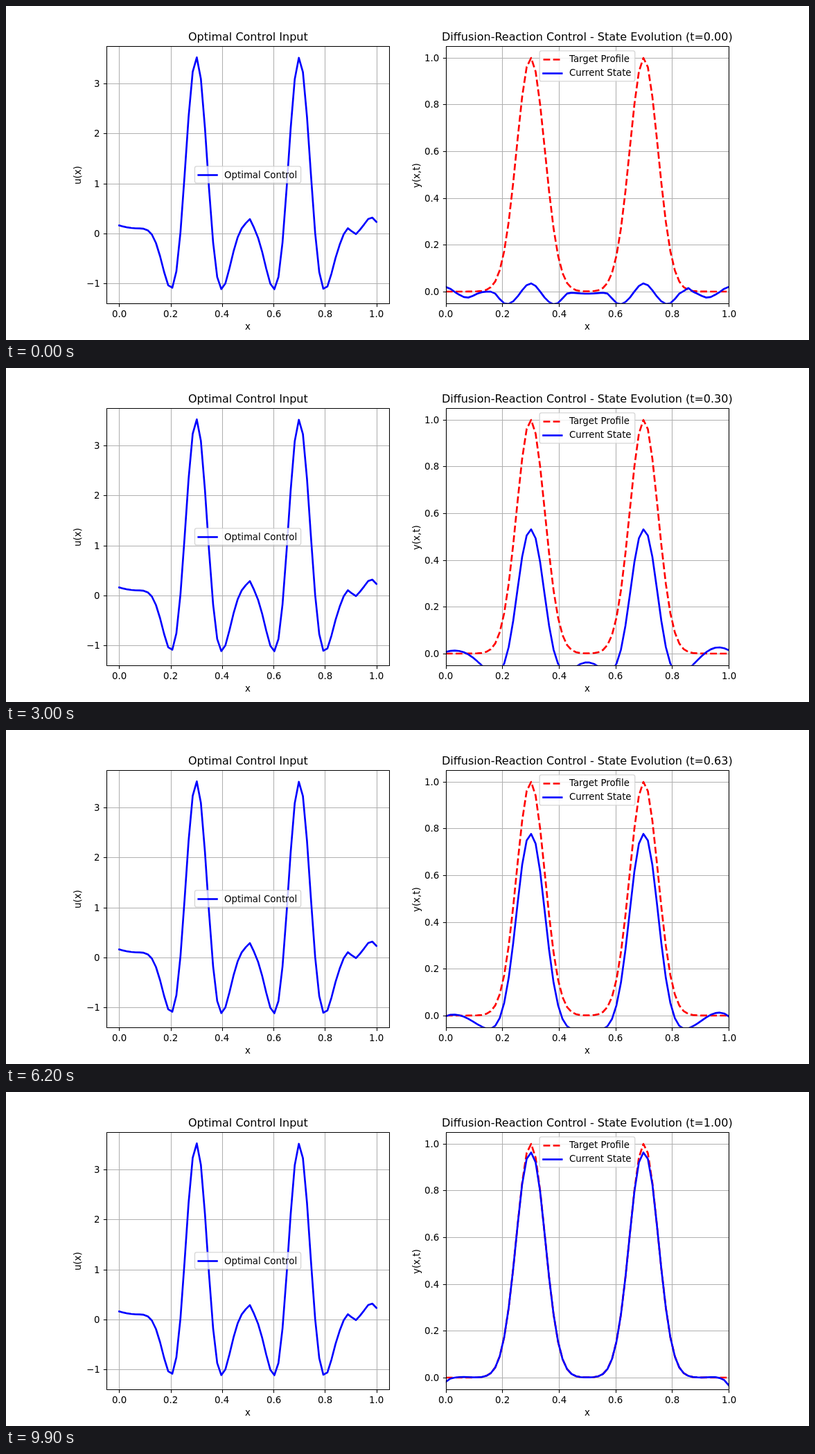
An HTML page with a canvas for the animation above (10 s loop, 1159 by 483 pixels).

```html
<!DOCTYPE html>
<html lang="en">
<head>
<meta charset="utf-8">
<title>Diffusion-Reaction Control</title>
<style>
html, body { margin: 0; width: 100%; height: 100%; overflow: hidden; background: #fff; }
canvas { display: block; }
</style>
</head>
<body>
<canvas id="stage" width="1159" height="483"></canvas>
<script>
const W = 1159, H = 483, POINTS = 64, FRAMES = 100, FRAME_MS = 100;
const FONT = '"DejaVu Sans", sans-serif';
const TEXT = 40 / 3, LINE = 8 / 3, HAIR = 1.067, TICK = 4.667;
const TOP = 57.96, BOTTOM = 429.87;
const ctx = document.getElementById('stage').getContext('2d');

const xs = Array.from({ length: POINTS }, (_, i) => i / (POINTS - 1));
const bell = z => Math.exp(-z * z / 2);
const bump = (x, height, center, width) => height * Math.exp(-(((x - center) / width) ** 2));
const bothHumps = (x, f) => f((x - 0.3) / 0.05) + f((x - 0.7) / 0.05);

const targetAt = x => bothHumps(x, bell);

// Damped wave around each hump over a gently uneven background.
const controlAt = x =>
  bothHumps(x, z => 3.52 * Math.cos(Math.PI * z / 2.48) * Math.exp(-0.235 * z * z))
  + 0.16 * Math.exp(-x / 0.1)
  + bump(x, 0.14, 0.5, 0.06) + bump(x, 0.1, 0.508, 0.012)
  + bump(x, 0.1, 0.885, 0.015) - bump(x, 0.06, 0.92, 0.012)
  + bump(x, 0.32, 0.98, 0.035);

const initialAt = x =>
  bothHumps(x, z => bump(z, 0.1, 0, 1.02) - 0.065 * Math.exp(-((z / 2.3) ** 8)))
  + bump(x, 0.02, 0, 0.025) - bump(x, 0.026, 0.075, 0.035)
  - bump(x, 0.009, 0.5, 0.07)
  + bump(x, 0.016, 0.857, 0.012) - bump(x, 0.026, 0.925, 0.035) + bump(x, 0.02, 1, 0.025);

const finalAt = x => targetAt(x)
  - bothHumps(x, z => bump(z, 0.037, 0, 0.45))
  + bump(x, 0.003, 0.06, 0.03) + bump(x, 0.003, 0.95, 0.03)
  - 0.018 * Math.exp(-x / 0.012) - 0.033 * Math.exp((x - 1) / 0.015);

// Diffusing response of one hump to a constant source.
function response(z, t) {
  const rate = 6.4, spread = Math.sqrt(1 + rate * t), steps = 16;
  let sum = 0;
  for (let i = 0; i < steps; i++) sum += bell(z / (1 + (spread - 1) * (i + 0.5) / steps));
  const stored = 2 / rate * (spread - 1) * sum / steps;
  return 0.84 * (bell(z) - bell(z / spread) / spread) + 0.8 * stored;
}

// Diffusion, a drift towards the final profile, and fading start and edge effects.
function stateAt(x, t) {
  const respond = time => bothHumps(x, z => response(z, time));
  const edge = bump(x, 0.014, 0.04, 0.06) + bump(x, 0.03, 0.96, 0.06);
  const trough = bump(x, 0.02, 0.13, 0.04) + bump(x, 0.02, 0.87, 0.04);
  const nearHump = Math.min(1, 2 * bothHumps(x, z => bump(z, 1, 0, Math.sqrt(6))));
  const drift = finalAt(x) - respond(1);
  const start = initialAt(x) - edge + trough;
  return respond(t)
    + drift * t ** (1.7 - 1.1 * nearHump)
    + edge * (1 - t * t) - trough * (1 - t) ** 2
    + start * Math.exp(-t / 0.07);
}

const snap = v => Math.floor(v + 0.5) + 0.5;

function segment(x1, y1, x2, y2, color) {
  ctx.strokeStyle = color;
  ctx.lineWidth = HAIR;
  ctx.lineCap = 'butt';
  ctx.beginPath();
  ctx.moveTo(x1, y1);
  ctx.lineTo(x2, y2);
  ctx.stroke();
}

// anchor: 0 left, 0.5 center, 1 right
function label(text, x, y, anchor = 0.5, size = TEXT) {
  ctx.font = `${size}px ${FONT}`;
  ctx.fillStyle = '#000';
  ctx.fillText(text, Math.round(x - anchor * ctx.measureText(text).width), y);
}

function polyline(points, color, dashed) {
  ctx.strokeStyle = color;
  ctx.lineWidth = LINE;
  ctx.lineJoin = 'round';
  ctx.lineCap = dashed ? 'butt' : 'square';
  ctx.setLineDash(dashed ? [3.7 * LINE, 1.6 * LINE] : []);
  ctx.beginPath();
  points.forEach(([x, y]) => ctx.lineTo(x, y));
  ctx.stroke();
  ctx.setLineDash([]);
}

function drawPlot(plot, title, curves) {
  const { left, right, x0, dx, y0, dy } = plot;
  const mid = (left + right) / 2;
  const px = x => x0 + dx * x, py = y => y0 - dy * y;
  const l = snap(left), r = snap(right), t = snap(TOP), b = snap(BOTTOM);
  const columns = [0, 0.2, 0.4, 0.6, 0.8, 1];

  columns.forEach(v => segment(snap(px(v)), t, snap(px(v)), b, '#b0b0b0'));
  plot.rows.forEach(v => segment(l, snap(py(v)), r, snap(py(v)), '#b0b0b0'));

  ctx.save();
  ctx.beginPath();
  ctx.rect(left, TOP, right - left, BOTTOM - TOP);
  ctx.clip();
  curves.forEach(c => polyline(xs.map(x => [px(x), py(c.at(x))]), c.color, c.dashed));
  ctx.restore();

  columns.forEach(v => {
    segment(snap(px(v)), b, snap(px(v)), b + TICK, '#000');
    label(v.toFixed(1), px(v), 450);
  });
  plot.rows.forEach(v => {
    segment(l, snap(py(v)), l - TICK, snap(py(v)), '#000');
    label(v.toFixed(plot.digits).replace('-', '\u2212'), left - 9.33, Math.round(py(v) + 4.9), 1);
  });
  ctx.strokeStyle = '#000';
  ctx.lineWidth = HAIR;
  ctx.strokeRect(l, t, r - l, b - t);

  label(title, mid, 50, 0.5, 16);
  label('x', mid, 468);
  ctx.save();
  ctx.translate(plot.nameX, 245);
  ctx.rotate(-Math.PI / 2);
  label(plot.name, 0, 0);
  ctx.restore();

  drawLegend(mid, plot.legend, curves);
}

function drawLegend(mid, box, curves) {
  ctx.font = `${TEXT}px ${FONT}`;
  const width = 48 + Math.max(...curves.map(c => ctx.measureText(c.label).width));
  const left = mid - width / 2;
  ctx.beginPath();
  ctx.roundRect(left, box.top, width, box.height, 2.67);
  ctx.fillStyle = 'rgba(255,255,255,0.8)';
  ctx.fill();
  ctx.strokeStyle = 'rgba(204,204,204,0.8)';
  ctx.lineWidth = 1.333;
  ctx.stroke();
  curves.forEach((c, i) => {
    const baseline = box.baseline + 20 * i, x = left + 5.33;
    const y = snap(baseline - 0.35 * TEXT);
    polyline([[x, y], [x + 26.67, y]], c.color, c.dashed);
    label(c.label, x + 37.33, Math.round(baseline), 0);
  });
}

const inputPlot = {
  left: 144.875, right: 553.16, x0: 163.43, dx: 371.17, y0: 328.85, dy: 72.2,
  rows: [-1, 0, 1, 2, 3], digits: 0, name: 'u(x)', nameX: 108,
  legend: { top: 231.9, height: 24, baseline: 248.6 }
};
const statePlot = {
  left: 634.82, right: 1043.1, x0: 634.82, dx: 408.28, y0: 412.97, dy: 338.1,
  rows: [0, 0.2, 0.4, 0.6, 0.8, 1], digits: 1, name: 'y(x,t)', nameX: 597,
  legend: { top: 64.9, height: 44, baseline: 81.3 }
};

function draw(frame) {
  const t = frame / (FRAMES - 1);
  ctx.fillStyle = '#fff';
  ctx.fillRect(0, 0, W, H);
  drawPlot(inputPlot, 'Optimal Control Input', [
    { at: controlAt, color: '#00f', label: 'Optimal Control' }
  ]);
  drawPlot(statePlot, `Diffusion-Reaction Control - State Evolution (t=${t.toFixed(2)})`, [
    { at: targetAt, color: '#f00', dashed: true, label: 'Target Profile' },
    { at: x => stateAt(x, t), color: '#00f', label: 'Current State' }
  ]);
}

let shown = -1;
function tick() {
  const frame = Math.floor(performance.now() / FRAME_MS) % FRAMES;
  if (frame !== shown) draw(shown = frame);
  requestAnimationFrame(tick);
}
tick();
</script>
</body>
</html>
```
